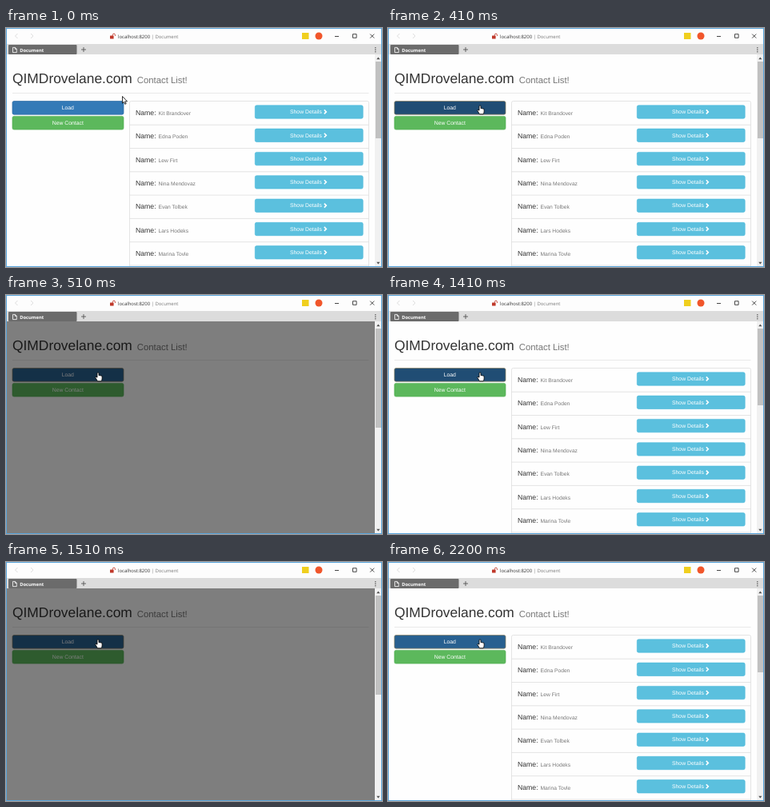
An HTML page that plays this animation: 470 px wide and 299 px high, repeating every 2310 ms.

```html
<!DOCTYPE html>
<html lang="en">
<head>
<meta charset="utf-8">
<title>Contact List</title>
<style>
  html, body { margin: 0; width: 100%; height: 100%; overflow: hidden; background: #fff; }
  svg { display: block; width: 100%; height: 100%; }
  text { font-family: "Liberation Sans", Arial, sans-serif; text-rendering: geometricPrecision; }
  .ui { font-family: "Open Sans", "Noto Sans", sans-serif; }
  .btn { font-size: 6.85px; fill: #fff; }
</style>
</head>
<body>
<svg viewBox="0 0 470 299" preserveAspectRatio="none">
  <rect width="470" height="299" fill="#fefefe"/>

  <g id="page">
    <text x="8" y="68.6" font-size="17.4" fill="#333">QIMDrovelane.com</text>
    <text x="163.7" y="68.6" font-size="11.35" fill="#777">Contact List!</text>
    <path d="M8 81.5H453.5" stroke="#e9e9e9"/>
    <g id="list"></g>
    <rect id="load" x="8" y="91.5" width="139" height="16.7" rx="2" stroke-width=".7"/>
    <text class="btn" x="77.3" y="102.3" text-anchor="middle">Load</text>
    <rect id="add" x="8" y="110.4" width="139" height="16.7" rx="2" stroke-width=".6"/>
    <text class="btn" x="77.3" y="121.2" text-anchor="middle">New Contact</text>
  </g>
  <rect id="shade" x="0" y="33" width="461" height="266" fill="#000" opacity=".5"/>

  <g id="scrollbar">
    <rect x="461" y="33" width="8.5" height="266" fill="#f1f1f1"/>
    <rect id="thumb" x="462" y="42" width="7" fill="#c1c1c1"/>
    <path d="M463.2 39.2l2.1-2.6 2.1 2.6zM463.2 292.8l2.1 2.6 2.1-2.6z" fill="#505050"/>
  </g>

  <g id="chrome">
    <rect width="470" height="20" fill="#fdfdfd"/>
    <rect y="20" width="470" height="13" fill="#dcdcdc"/>
    <rect x="3" y="21" width="85.5" height="12" rx="1" fill="#6b6b6b"/>
    <path d="M8.5 24.4h3l1.8 1.8v4.4H8.5zM11.3 24.4v2h2" fill="none" stroke="#fff" stroke-width=".8"/>
    <text class="ui" x="17.2" y="29.7" font-size="5.8" font-weight="700" fill="#fff">Document</text>
    <path d="M94 27h6M97 24v6" stroke="#555" stroke-width=".9"/>
    <g fill="#555"><circle cx="461.8" cy="24.8" r=".8"/><circle cx="461.8" cy="27.3" r=".8"/><circle cx="461.8" cy="29.8" r=".8"/></g>
    <path d="M14.5 7l-3 3 3 3M31 7l3 3-3 3" fill="none" stroke="#dedede"/>
    <rect x="130" y="9.6" width="4.6" height="3.8" rx=".5" fill="#c0392b"/>
    <path d="M133.4 9.8V8.6a1.5 1.5 0 0 1 3 0V10" fill="none" stroke="#c0392b" stroke-width=".9"/>
    <text class="ui" x="140" y="12.6" font-size="5.95" fill="#333">localhost:8200<tspan fill="#777"> | Document</tspan></text>
    <rect x="370" y="6" width="8.5" height="8" fill="#f0cf1e"/>
    <circle cx="391" cy="10" r="4.5" fill="#f1562b"/>
    <path d="M411 10.5h5M433.5 7.7h4.6v4.6h-4.6zM455.2 7.6l5 5M460.2 7.6l-5 5" fill="none" stroke="#333" stroke-width=".9"/>
  </g>
  <rect x=".5" y=".5" width="469" height="298" fill="none" stroke="#5aa5dc"/>

  <g id="cursor" stroke="#000" stroke-width=".8" stroke-linejoin="round" fill="#fff">
    <path id="arrow" d="M0 0V8.6L2 6.8 3.3 9.8 4.7 9.2 3.4 6.3H6z"/>
    <path id="hand" d="M-1 6.2V.8Q-1 0 0 0T1 .8V3.6Q2 3.1 2.6 3.9 3.5 3.4 4 4.2 5.1 3.9 5.1 5V7.6Q5.1 9 4.2 10.8H-.6Q-1.5 8.8-2.9 7 -3.6 6-2.8 5.5 -2 5.1-1 6.2z"/>
  </g>
</svg>
<script>
const LOOP = 2310;
const PATH = [[145.5, 85.5], [138, 122], [115, 122], [115, 97]];
const CONTACTS = ["Kit Brandover", "Edna Poden", "Lew Firt", "Nina Mendovaz", "Evan Tolbek", "Lars Hodeks", "Marina Tovle"];
const ROW = 29.3;

const el = id => document.getElementById(id);
const set = (id, attrs) => {
  for (const key in attrs) el(id).setAttribute(key, attrs[key]);
};
const show = (id, on) => set(id, { display: on ? "inline" : "none" });
const within = (t, from, to) => t >= from && t < to;

const row = (name, i) => `<g transform="translate(0 ${i * ROW})">
  <path d="M154.5 121.2H453.5" stroke="#ddd" stroke-width=".8"/>
  <text x="162" y="109" font-size="8.7" fill="#333">Name: <tspan x="190.5" font-size="6.7" fill="#777">${name}</tspan></text>
  <rect x="311.3" y="96.8" width="134.9" height="16.4" rx="2" fill="#5bc0de" stroke="#46b8da" stroke-width=".6"/>
  <text class="btn" x="355" y="107.3">Show Details</text>
  <path d="M397.8 102.4l2.5 2.5-2.5 2.5" fill="none" stroke="#fff" stroke-width="1.6"/>
</g>`;

el("list").innerHTML = CONTACTS.map(row).join("") +
  '<path d="M154.5 299V93.5q0-2 2-2h295q2 0 2 2V299" fill="none" stroke="#ddd" stroke-width=".8"/>';

function bezier([a, b, c, d], u) {
  const v = 1 - u;
  return [0, 1].map(k => v * v * v * a[k] + 3 * v * v * u * b[k] + 3 * v * u * u * c[k] + u * u * u * d[k]);
}

function draw(t) {
  // The pointer moves in seven steps, 40 ms apart.
  const step = Math.max(0, Math.min(7, Math.floor((t - 30) / 40) + 1));
  const [x, y] = bezier(PATH, step / 7);
  const onLoad = within(y, 91, 108.5);
  const onAdd = within(y, 110, 127.5);
  const pressed = within(t, 410, 510) || within(t, 1410, 1510);
  const loading = within(t, 510, 1130) || within(t, 1510, 2130);
  const focused = t >= 410;

  set("cursor", { transform: `translate(${x} ${y})` });
  show("arrow", !onLoad && !onAdd);
  show("hand", onLoad || onAdd);

  set("load", {
    fill: pressed ? "#204d74" : onLoad ? "#286090" : "#337ab7",
    stroke: focused ? "#8f8160" : onLoad ? "#204d74" : "#2e6da4"
  });
  set("add", {
    fill: onAdd ? "#449d44" : "#5cb85c",
    stroke: onAdd ? "#398439" : "#4cae4c"
  });

  show("list", !loading);
  show("shade", loading);
  set("thumb", { height: loading ? 124 : 96 });
}

function tick() {
  draw(performance.now() % LOOP);
  requestAnimationFrame(tick);
}
tick();
</script>
</body>
</html>
```
